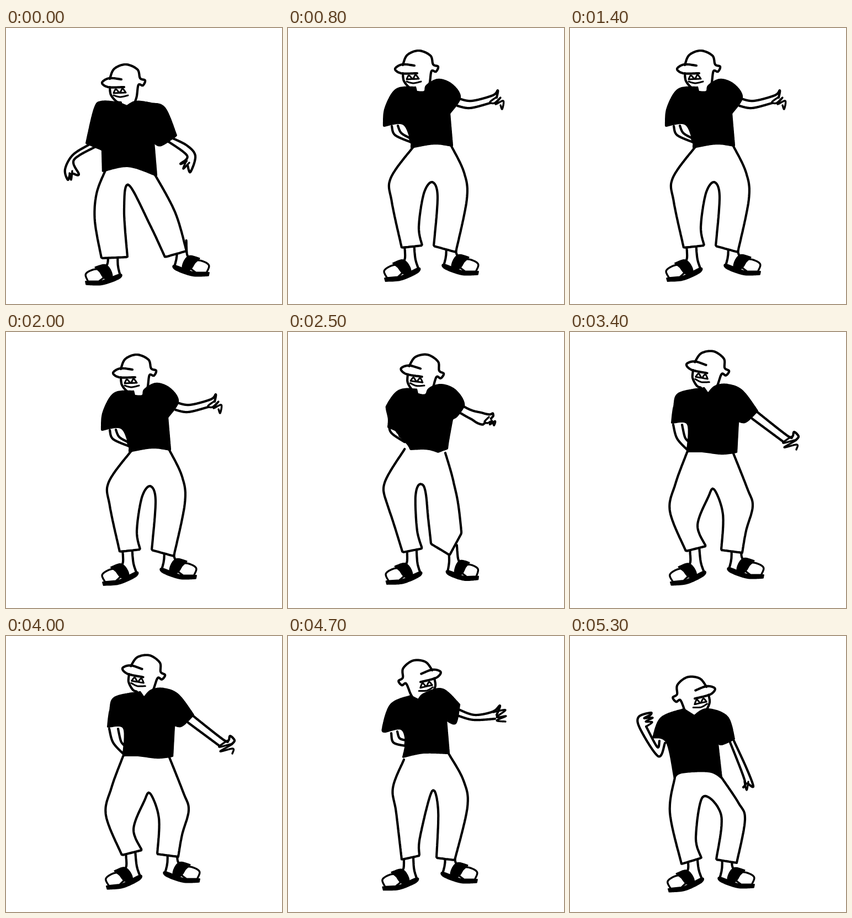
An HTML page that plays this animation: 500x500 px, repeating every 5400 ms.

```html
<!DOCTYPE html>
<html lang="en">
<head>
<meta charset="utf-8">
<title>Dancer</title>
<style>
html, body { margin: 0; width: 100%; height: 100%; overflow: hidden; background: #fff; }
svg { display: block; width: 100%; height: 100%; }
path { fill: none; stroke: #000; stroke-width: 4.2; stroke-linecap: round; stroke-linejoin: round; }
.face { stroke-width: 3; }
.hand { stroke-width: 3.4; }
.ink { fill: #000; stroke-width: 2.4; }
.toes { fill: #fff; stroke-width: 3.4; }
.legs { fill: #fff; }
</style>
</head>
<body>
<svg viewBox="0 0 500 500"></svg>
<script>
const mix = (a, b, u) => a + (b - a) * u;
const nums = text => text.trim().split(/\s+/).map(Number);

// Smooth curve through points
function smooth(p, out) {
  const last = p.length - 1;
  for (let i = 0; i < last; i++) {
    const a = p[Math.max(i - 1, 0)], b = p[i], c = p[i + 1], d = p[Math.min(i + 2, last)];
    for (let s = 0; s < 12; s++) {
      const u = s / 12;
      out.push([0, 1].map(k => b[k] + u / 2 * (c[k] - a[k] +
        u * (2 * a[k] - 5 * b[k] + 4 * c[k] - d[k] + u * (3 * (b[k] - c[k]) + d[k] - a[k])))));
    }
  }
}

// A bar makes the point before it a sharp corner
function curve(text) {
  const out = [];
  let end = null;
  for (const piece of text.split('|')) {
    const n = nums(piece), p = end ? [end] : [];
    for (let i = 0; i < n.length; i += 2) p.push([n[i], n[i + 1]]);
    smooth(p, out);
    end = p[p.length - 1];
  }
  out.push(end);
  return out;
}

// Even spacing lets any two strokes blend point by point
function even(line, count = 240) {
  const len = [0];
  for (let i = 1; i < line.length; i++)
    len.push(len[i - 1] + Math.hypot(line[i][0] - line[i - 1][0], line[i][1] - line[i - 1][1]));
  return Array.from({ length: count }, (_, s) => {
    const at = len[len.length - 1] * s / (count - 1);
    let i = 0;
    while (i < line.length - 2 && len[i + 1] < at) i++;
    const u = (at - len[i]) / (len[i + 1] - len[i] || 1);
    return [mix(line[i][0], line[i + 1][0], u), mix(line[i][1], line[i + 1][1], u)];
  });
}

const head = [
  '-27 -3 -19 -21 2 -29 23 -20 28 -4 37 0 33 9 25 8 22 28 19 38',
  '-6 -2 -28 -4 -41 4 -30 12 -1 12',
  '-20 23 -16 16 -9 22 -4 15 2 22 | -20 23',
  '-20 27 -8 30 6 27',
  '-27 12 -25 26 -15 38 -7 40'
].map(curve);

const foot = [
  '-8 -14 -9 8 -13 16',
  '8 -14 8 12 12 30',
  '-42 40 -46 28 -36 21 -24 20 -14 30 -24 40',
  '-46 40 -22 40 11 28 10 35 -18 45 -45 45',
  '-30 16 -14 12 -5 20 -2 33 -14 35 -22 24'
].map(curve);

// Placement of a part: x, y, turn in degrees, width (negative faces right)
const place = text => nums(text);
const poses = {};
function pose(name, { arms, legs, shirt, face, left, right }) {
  poses[name] = {
    body: [...arms, legs, shirt].map(s => even(curve(s))),
    parts: [face, left, right].map(place)
  };
}

pose('wide', {
  face: '215 95 0 1', left: '194 416 0 1', right: '318 400 0 -1',
  arms: ['151 211 121 230 107 256 112 275 116 264', '162 215 123 239 132 265 122 264', '115 263 118 275 120 259',
    '298 198 328 213 343 232 334 261 329 249', '290 203 328 231 316 246 327 241', '327 240 321 255 332 244'],
  legs: '180 258 164 300 161 350 173 417 | 220 415 | 214 330 222 284 261 357 288 415 | 327 404 | 306 333 266 259',
  shirt: '205 135 173 133 160 146 145 209 | 174 221 | 175 260 | 222 251 273 268 | 268 208 | 281 213 309 195 | 288 145 262 136 235 133 219 141'
});
pose('thumb', {
  face: '235 70 0 1', left: '221 406 -5 1', right: '295 398 0 -1',
  arms: ['188 178 194 194 223 207', '199 177 205 190 220 199', '220 199 223 207',
    '310 128 333 132 371 122 380 113 378 126', '307 141 330 145 366 136',
    '378 125 366 134 374 136 385 126 376 138 390 132 388 147 385 140'],
  legs: '228 214 186 272 188 315 206 398 | 243 394 | 237 360 246 300 261 279 271 305 264 395 | 304 406 | 324 310 319 262 295 212',
  shirt: '231 107 196 111 176 145 173 178 | 208 174 222 202 223 217 | 265 210 298 214 | 293 155 | 312 126 297 102 272 93 251 104 247 115 233 115'
});
pose('lean', {
  face: '267 68 29 1', left: '233 404 0 1', right: '307 409 -8 -.65',
  arms: ['178 131 167 156 188 184', '188 143 181 160 191 176', '190 177 188 184',
    '333 148 359 181 347 205 356 220 347 219', '322 158 341 186 330 212 336 228 340 221', '336 212 338 229 346 224 343 210'],
  legs: '178 208 153 273 159 305 184 345 211 401 | 243 389 | 220 338 195 280 201 261 222 312 243 350 271 402 | 313 377 | 277 333 262 296 265 233',
  shirt: '237 97 207 97 176 130 | 200 149 177 207 | 205 203 248 212 267 233 | 273 202 306 158 | 319 164 335 143 | 313 109 272 97 252 110 239 106'
});
pose('reach', {
  face: '252 63 12 1', left: '227 405 -6 1', right: '301 397 0 -1',
  arms: ['187 168 194 193 213 214', '203 168 208 190 214 198', '214 203 213 212',
    '338 144 394 188 403 189 406 181 414 189 409 196', '330 157 388 200',
    '400 190 386 201 409 196 388 209 411 204 410 213'],
  legs: '212 218 191 275 181 325 210 397 | 246 388 | 231 350 250 300 261 285 277 330 274 395 | 312 400 | 319 360 331 315 321 283 296 220',
  shirt: '243 101 197 111 188 135 184 165 | 213 167 212 217 | 240 217 275 221 302 218 | 305 162 | 319 163 340 143 | 312 106 285 95 263 98 250 111'
});
pose('turn', {
  face: '236 72 -15 -1', left: '219 409 -3 1', right: '293 398 0 -1',
  arms: ['187 176 191 193 212 199', '198 173 202 185 213 189', '213 189 212 199',
    '309 133 338 143 371 137 384 126 378 143', '307 144 336 152 375 150',
    '372 138 394 134 378 147 395 145 378 153 394 155'],
  legs: '210 224 190 275 196 320 206 405 | 238 398 | 239 365 261 281 272 315 269 402 | 302 406 | 325 310 318 262 291 213',
  shirt: '222 108 186 124 171 168 176 174 | 205 169 213 192 208 220 | 245 212 292 213 | 287 153 | 304 158 311 124 | 280 96 247 104 236 115'
});
pose('fist', {
  face: '222 102 -15 -1', left: '223 410 -6 1', right: '284 407 0 -1',
  arms: ['172 194 160 218 128 170 124 147 147 139 142 147', '162 190 158 201 138 164',
    '147 142 134 149 150 148 137 155 149 156 138 164',
    '297 190 320 240 332 272 323 268', '289 190 316 260 314 274 319 267', '316 264 320 279 323 264'],
  legs: '190 256 181 320 202 413 | 238 402 | 228 365 241 291 274 325 265 405 | 302 411 | 317 333 305 302 270 250',
  shirt: '206 132 165 148 150 184 | 175 193 189 258 | 202 248 252 246 275 258 | 267 187 | 273 197 298 187 | 285 146 248 132 225 144'
});

// Dance steps: tick and pose, ticks between are in-betweens
const keys = [[0, 'wide'], [2, 'thumb'], [5, 'fist']];
for (let k = 8; k < 44; k += 6)
  keys.push([k, 'thumb'], [k + 2, 'reach'], [k + 3, k === 14 ? 'fist' : 'lean']);
keys.push([44, 'thumb'], [47, 'turn'], [50, 'thumb'], [52, 'wide'], [53, 'fist'], [54, 'wide']);

const TICK = 100, TICKS = 54;
const limb = ['', '', 'hand'], shoe = ['', '', 'toes', 'ink', 'ink'];
const classes = [...shoe, ...shoe, ...limb, ...limb, 'legs', 'ink', '', '', 'face', 'face', ''];
const svg = document.querySelector('svg');
svg.innerHTML = classes.map(c => `<path class="${c}"/>`).join('');
const paths = [...svg.children];

function blend(a, b, u) {
  const at = a.map((v, i) => mix(v, b[i], u));
  if (a[3] * b[3] < 0) at[3] = u < .5 ? a[3] : b[3];
  return at;
}

function put(lines, [x, y, turn, width], size) {
  const c = Math.cos(turn * Math.PI / 180) * size, s = Math.sin(turn * Math.PI / 180) * size;
  return lines.map(line => line.map(([px, py]) =>
    [x + px * width * c - py * s, y + px * width * s + py * c]));
}

function draw(tick) {
  const i = keys.findIndex(k => k[0] > tick);
  const [t0, from] = keys[i - 1], [t1, to] = keys[i];
  const u = (tick - t0) / (t1 - t0), a = poses[from], b = poses[to];
  const body = a.body.map((line, j) =>
    line.map((p, k) => [mix(p[0], b.body[j][k][0], u), mix(p[1], b.body[j][k][1], u)]));
  const [face, left, right] = a.parts.map((p, j) => blend(p, b.parts[j], u));
  const lines = [...put(foot, left, 1.08), ...put(foot, right, 1.08), ...body, ...put(head, face, 1)];
  lines.forEach((line, j) => {
    const closed = classes[j] === 'ink' || classes[j] === 'toes';
    paths[j].setAttribute('d', 'M' + line.map(p => p[0].toFixed(1) + ' ' + p[1].toFixed(1)).join('L') + (closed ? 'Z' : ''));
  });
}

const start = performance.now();
let shown = -1;
function loop() {
  const tick = Math.floor((performance.now() - start) / TICK) % TICKS;
  if (tick !== shown) draw(shown = tick);
  requestAnimationFrame(loop);
}
loop();
</script>
</body>
</html>
```
